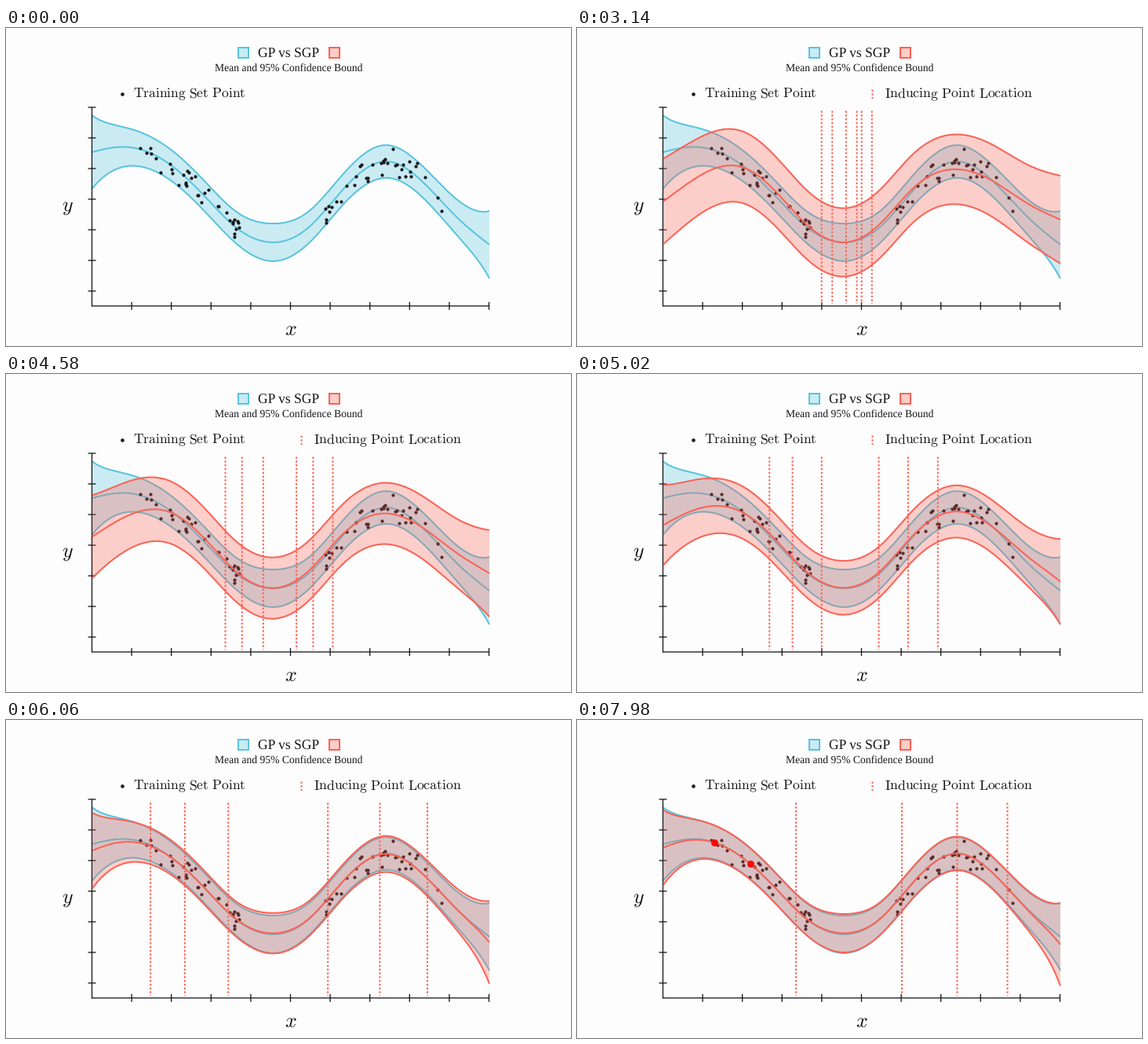
A matplotlib script for the animation above (8000 ms loop, 720 by 405 pixels).

```python
import numpy as np
import matplotlib.pyplot as plt
from matplotlib.animation import FuncAnimation
from matplotlib.patches import Polygon, Rectangle
from matplotlib.transforms import Bbox

W, H = 720, 405
STEP, FRAMES = 40, 200
BG, INK = "#fdfdfd", "#16161a"
BLUE, RED, DOT_RED = "#58c4dd", "#fc6255", "#ff0808"
FILL_ALPHA = 0.3
LEFT, RIGHT, FLOOR = 109.5, 616, 354
TOP, BOTTOM = 105.5, 351
DOTTED = (0, (1.2, 1.2))

plt.rcParams["mathtext.fontset"] = "cm"
plt.rcParams["text.hinting"] = "none"

# Key points: x, mean of the full model, how far the sparse mean starts off it
KEYS = np.array([
    [110, 158, 63], [135, 152.5, 50], [160, 152.2, 34], [210, 174.5, 2.5],
    [250, 211, -6], [295, 255.5, -3], [340, 273, 0], [385, 254.5, -4],
    [430, 205, -2.5], [485, 170, 10], [530, 195, 0], [575, 241.5, -17.5],
    [616, 276, -32]])
STEM_START = np.array([312, 325.5, 343, 356.5, 362.5, 375.5])
STEM_END = np.array([175, 221, 279, 414, 484.5, 548.5])


def smooth(t, start, length):
    """Sigmoid ease from 0 to 1."""
    u = np.clip((t - start) / length, 0, 1)
    low = 1 / (1 + np.exp(5))
    return np.clip((1 / (1 + np.exp(5 - 10 * u)) - low) / (1 - 2 * low), 0, 1)


def spline(knots, values, x):
    """Natural cubic spline."""
    n, h = len(knots), np.diff(knots)
    a, rhs = np.eye(n), np.zeros(n)
    slope = np.diff(values) / h
    for i in range(1, n - 1):
        a[i, i - 1:i + 2] = h[i - 1], 2 * (h[i - 1] + h[i]), h[i]
        rhs[i] = 6 * (slope[i] - slope[i - 1])
    curv = np.linalg.solve(a, rhs)
    k = np.clip(np.searchsorted(knots, x) - 1, 0, n - 2)
    q = (x - knots[k]) / h[k]
    p = 1 - q
    return (p * values[k] + q * values[k + 1]
            + ((p**3 - p) * curv[k] + (q**3 - q) * curv[k + 1]) * h[k]**2 / 6)


def bump(center, width):
    return np.exp(-((xs - center) / width)**2)


def edges(left, left_reach, right, right_reach):
    """Terms that grow toward the two ends of the x axis."""
    return (left * np.exp((xs[0] - xs) / left_reach)
            + right * np.exp((xs - xs[-1]) / right_reach))


xs = np.linspace(LEFT + 0.5, RIGHT, 200)
gp_mean = spline(KEYS[:, 0], KEYS[:, 1], xs)
gp_half = (19 + 4.9 * bump(340, 40) + 1.8 * bump(480, 40)
           + edges(27.5, 27, 24, 22))
loose_mean = gp_mean + spline(KEYS[:, 0], KEYS[:, 2], xs)
loose_half = 43 + edges(11.5, 70, 13, 60)
tight_mean = gp_mean - 1.5 * bump(340, 40) + edges(4.5, 30, 10, 20)
tight_half = gp_half + 0.6 + edges(0.6, 30, 9, 25)


def lerp(a, b, u):
    return a + (b - a) * u


def band(mean, half):
    return mean - half, mean, mean + half


def outline(upper, lower):
    return np.column_stack([np.r_[xs, xs[::-1]], np.r_[upper, lower[::-1]]])


fig = plt.figure(figsize=(W / 72, H / 72), dpi=72, facecolor=BG)
ax = fig.add_axes([0, 0, 1, 1])
ax.set_xlim(0, W)
ax.set_ylim(H, 0)
ax.axis("off")


def segment(x, y, width=1.3, color=INK, **kw):
    return ax.plot(x, y, color=color, lw=width, solid_capstyle="butt",
                   snap=False, **kw)[0]


def dots(x, y, size, color=INK, z=3):
    return ax.plot(x, y, "o", ms=size, mew=0, color=color, zorder=z)[0]


def label(x, y, text, size, **kw):
    return ax.text(x, y, text, fontsize=size, color=INK, **kw)


def swatch(x, color):
    ax.add_patch(Rectangle((x, 25), 13, 13, fc=color, alpha=FILL_ALPHA, lw=0))
    ax.add_patch(Rectangle((x, 25), 13, 13, fc="none", ec=color, lw=2))


# Titles and legend
label(360, 37.5, "GP vs SGP", 17.55, family="Liberation Serif", ha="center")
label(360, 56, "Mean and 95% Confidence Bound", 13.65,
      family="Liberation Serif", ha="center")
swatch(295.5, BLUE)
swatch(411.5, RED)
dots([148], [84], 4.6)
label(162.5, 88.5, r"$\mathrm{Training\ Set\ Point}$", 17.5)
inducing_text = label(392.5, 88.5, r"$\mathrm{Inducing\ Point\ Location}$", 17.7,
                      clip_on=True)
inducing_icon = segment([], [], 2, RED, linestyle=DOTTED)

# Axes
segment([LEFT, LEFT], [101, FLOOR + 0.5], zorder=4)
segment([LEFT - 0.5, RIGHT], [FLOOR, FLOOR], zorder=4)
for k in range(7):
    segment([LEFT - 5, LEFT + 5], [101 + 39 * k] * 2, zorder=4)
for k in range(1, 11):
    segment([LEFT + 50.6 * k] * 2, [FLOOR - 5, FLOOR + 5], zorder=4)
label(362.5, 384, "$x$", 26, ha="center", va="center")
label(78.5, 227, "$y$", 26, ha="center", va="center")

# Full model with noisy samples in two stretches
gp = band(gp_mean, gp_half)
ax.add_patch(Polygon(outline(gp[0], gp[2]), fc=BLUE, alpha=FILL_ALPHA, lw=0, zorder=1))
for curve in gp:
    segment(xs, curve, 2, BLUE, zorder=2)
rng = np.random.default_rng(4)
for start, end, count in ((160, 299, 36), (396, 566, 38)):
    px = rng.uniform(start, end, count)
    noise = np.clip(rng.normal(0, 10, count), -18, 18)
    dots(px, np.interp(px, xs, gp_mean) + noise, 4.2)

# Sparse model
area = ax.add_patch(Polygon(outline(gp[0], gp[2]), fc=RED, lw=0, zorder=5))
sgp_lines = [segment([], [], 2, RED, zorder=6) for _ in range(3)]
stems = [segment([], [], 2, RED, linestyle=DOTTED, zorder=7) for _ in STEM_START]
marks = [dots([], [], 9, DOT_RED, 8) for _ in range(2)]


def draw(frame):
    t = frame * STEP / 1000
    fit = smooth(t, 3.02, 4)
    curves = band(lerp(loose_mean, tight_mean, fit), lerp(loose_half, tight_half, fit))

    # Border first, then fill
    drawn = int(round(smooth(t, 0, 1) * len(xs)))
    filled = smooth(t, 1, 1)
    for line, curve in zip(sgp_lines, curves):
        line.set_data(xs[:drawn], curve[:drawn])
        line.set_linewidth(1 + filled)
    area.set_xy(outline(curves[0], curves[2]))
    area.set_alpha(FILL_ALPHA * filled)

    written = smooth(t, 2, 0.5)
    inducing_text.set_clip_box(
        Bbox.from_extents(388, H - 100, 388 + 200 * written, H - 70))
    inducing_text.set_visible(written > 0)
    inducing_icon.set_data([376.5] * 2, [78.5, 78.5 + 11.5 * written])

    # Stems grow, slide with the fit, then collapse into marks one by one
    grown = smooth(t, 2.5, 0.5)
    for i, x in enumerate(lerp(STEM_START, STEM_END, fit)):
        top, end = TOP, lerp(TOP, BOTTOM, grown)
        if i < len(marks):
            y = np.interp(x, xs, curves[1])
            u = smooth(t, 7 + 0.48 * i, 0.48)
            top, end = lerp(top, y, u), lerp(end, y, u)
            marks[i].set_data([x], [y])
            marks[i].set_markersize(9 * u)
            marks[i].set_visible(u > 0)
        stems[i].set_data([x, x], [top, end])
        stems[i].set_visible(end - top > 1)
    return []


anim = FuncAnimation(fig, draw, frames=FRAMES, interval=STEP,
                     repeat=True, repeat_delay=0, blit=False)
plt.show()
```
